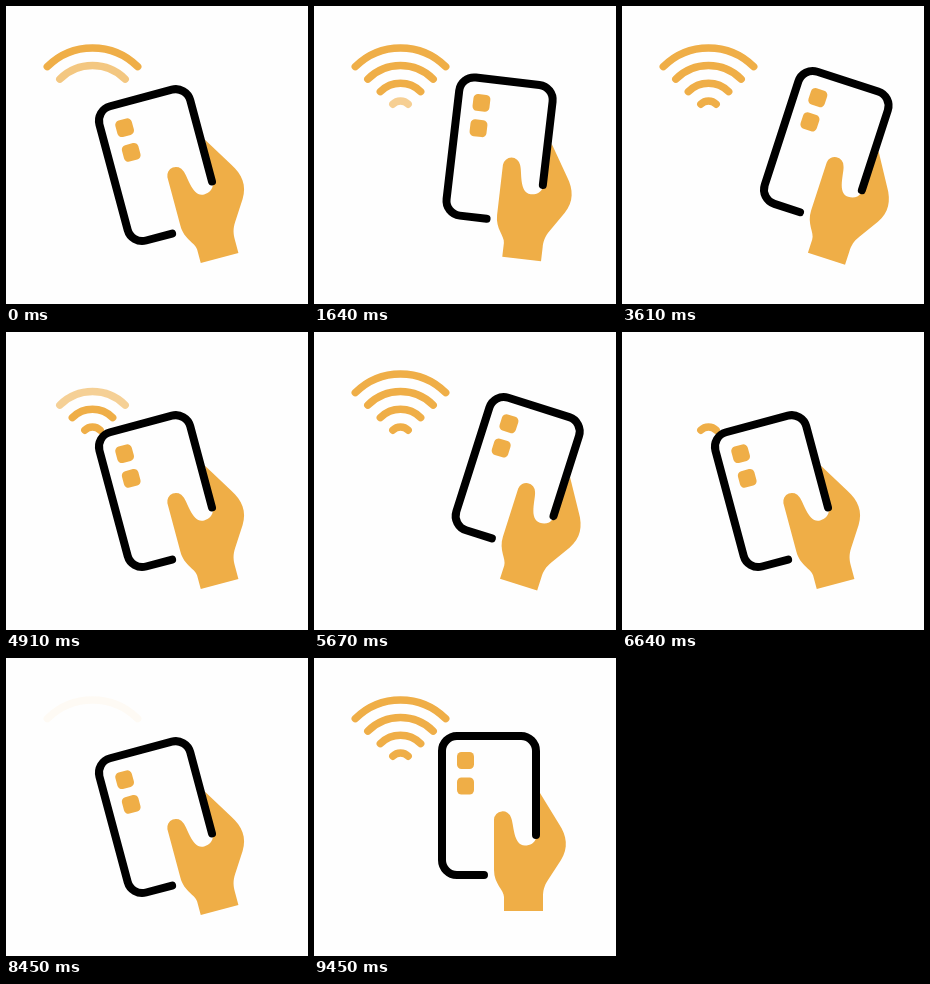
Recreate the animation shown at these times as an HTML page. Size 302 px wide and 298 px high, loop 9480 ms.

```html
<!DOCTYPE html>
<html lang="en">
<head>
<meta charset="utf-8">
<title>Contactless phone</title>
<style>
  html, body { margin: 0; width: 100%; height: 100%; overflow: hidden; background: #fefefe; }
  svg { display: block; width: 100%; height: 100%; }
  .line { fill: none; stroke-linecap: round; stroke-linejoin: round; }
</style>
</head>
<body>
<svg viewBox="0 0 302 298">
  <g id="waves" class="line" stroke="#efae47" stroke-width="7.500"></g>
  <g id="phone">
    <path fill="#efae47" d="M190 253V239C190 232 180 226 180 212V161.500A8.700 8.700 0 0 1 197 159.500C200 166 199 187.500 211 187.500C216 187.500 221 185 222 180L226 135L245 166C253 178 254.500 190 247 202L234 222C230 228 229 233 229 239V253Z"/>
    <path class="line" stroke="#000" stroke-width="8" d="M170 217H143A15 15 0 0 1 128 202V93A15 15 0 0 1 143 78H207A15 15 0 0 1 222 93V177"/>
    <g fill="#efae47">
      <rect x="143" y="94" width="17" height="17" rx="4.500"/>
      <rect x="143" y="119.500" width="17" height="17" rx="4.500"/>
    </g>
  </g>
</svg>
<script>
const LOOP = 9480, CYCLE = 2045, START = 400;
const RADII = [10.8, 28.5, 46.2, 63.9];
// [time, angle] poses within one cycle
const POSES = [[400, -15], [860, -15], [1010, 0], [1370, 0], [1550, 18], [1570, 18], [1750, -15], [2445, -15]];

const phone = document.getElementById("phone");
const waves = document.getElementById("waves");

const ramp = (t, from, to) => Math.min(1, Math.max(0, (t - from) / (to - from)));
const smooth = x => x * x * (3 - 2 * x);

const arcs = RADII.map(r => {
  const arc = document.createElementNS("http://www.w3.org/2000/svg", "path");
  const d = r * Math.SQRT1_2;
  arc.setAttribute("d", `M${86.5 - d} ${105.8 - d}A${r} ${r} 0 0 1 ${86.5 + d} ${105.8 - d}`);
  waves.append(arc);
  return arc;
});

function angleAt(t) {
  const i = POSES.findIndex(([end]) => t < end);
  const [t0, a0] = POSES[i - 1], [t1, a1] = POSES[i];
  return a0 + (a1 - a0) * smooth(ramp(t, t0, t1));
}

function draw(time) {
  const t = (time % LOOP - START + CYCLE) % CYCLE + START;
  phone.setAttribute("transform", `rotate(${angleAt(t)} 208 237)`);
  arcs.forEach((arc, i) => {
    const on = 405 + i * 180, off = 1600 + i * 207;
    arc.setAttribute("opacity", ramp(t, on, on + 100) - ramp(t, off, off + 100));
  });
}

const begin = performance.now();
function tick() {
  draw(performance.now() - begin);
  requestAnimationFrame(tick);
}
tick();
</script>
</body>
</html>
```
